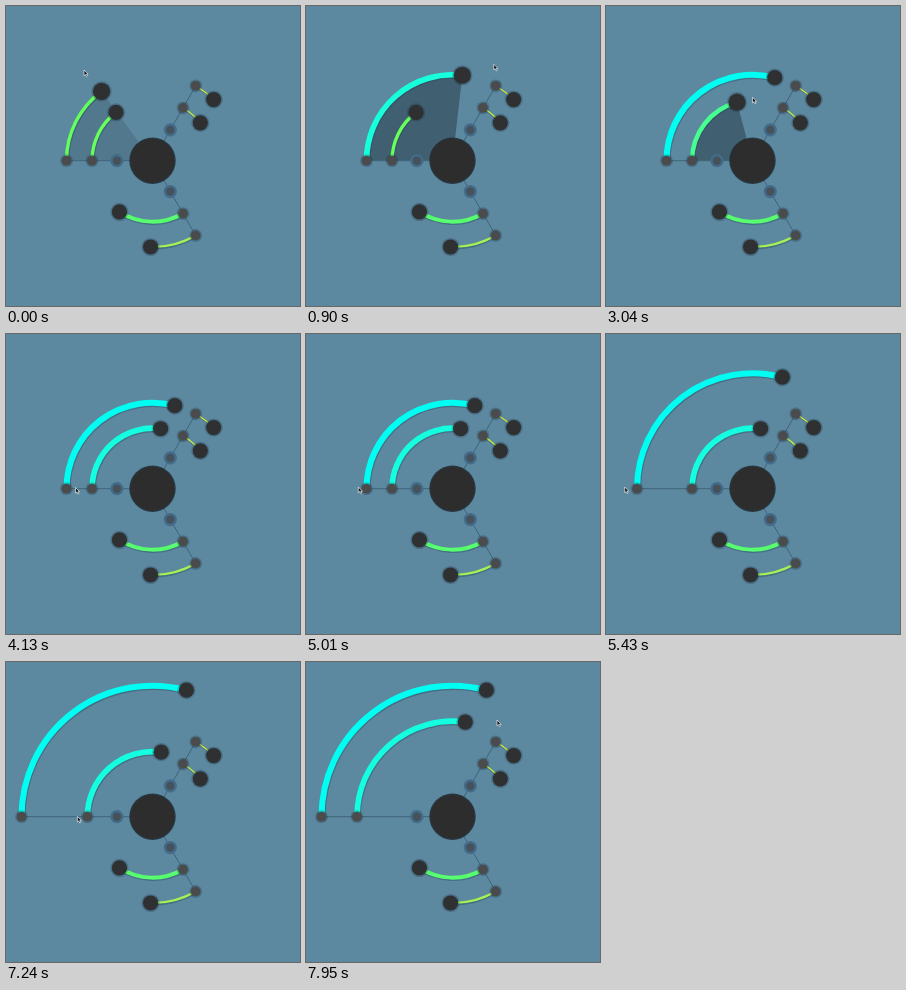
Animation of 294x300 px, one loop 8000 ms. Source, as an HTML page:

```html
<!DOCTYPE html>
<html lang="en">
<head>
<meta charset="utf-8">
<title>Radial sliders</title>
<style>
html, body { margin: 0; width: 100%; height: 100%; overflow: hidden; background: #5c88a0; }
svg { display: block; width: 294px; height: 300px; }
</style>
</head>
<body>
<svg id="stage" viewBox="0 0 294 300" xmlns="http://www.w3.org/2000/svg"></svg>
<script>
const LOOP = 8000, CX = 146.5, CY = 154.7;
const stage = document.getElementById('stage');

function set(el, attrs) {
  for (const k in attrs) el.setAttribute(k, attrs[k]);
}
function add(tag, attrs) {
  const el = document.createElementNS('http://www.w3.org/2000/svg', tag);
  set(el, attrs);
  return stage.appendChild(el);
}

const clamp = (v, lo = 0, hi = 1) => Math.min(hi, Math.max(lo, v));
const ease = u => (1 - Math.cos(Math.PI * u)) / 2;

function polar(r, deg) {
  const a = deg * Math.PI / 180;
  return [CX + r * Math.cos(a), CY + r * Math.sin(a)];
}
function arcPath(r, from, to) {
  const [x, y] = polar(r, from), [x2, y2] = polar(r, to);
  return `M${x} ${y}A${r} ${r} 0 0 ${to > from ? 1 : 0} ${x2} ${y2}`;
}

// Pointer stops: time, x, y
const stops = [
  [90, 78, 64], [1000, 191, 58], [1400, 214, 75], [1880, 122, 89],
  [2240, 109, 105], [2390, 109, 105], [3350, 158, 87], [3850, 51, 160],
  [4130, 69.5, 153.5], [4480, 61.5, 153], [4770, 61.5, 153],
  [5600, 14, 153], [5750, 14, 153], [6380, 86, 154], [6880, 86, 154],
  [7700, 50, 155], [7950, 83, 155]
];

function pointer(t) {
  const i = clamp(stops.findIndex(s => s[0] > t), 1, stops.length - 1);
  const [t0, x0, y0] = stops[i - 1], [t1, x1, y1] = stops[i];
  const u = ease(clamp((t - t0) / (t1 - t0)));
  return [x0 + (x1 - x0) * u, y0 + (y1 - y0) * u];
}

// Each ring is turned by its knob, then resized by its node.
const rings = [
  {
    turn: { press: -100, release: 1400, lag: 235, min: 53.7, max: 105 },
    size: { press: 4770, release: 5750, lag: 170, min: 86, max: 131 }
  },
  {
    turn: { press: 2390, release: 3400, lag: 200, min: 52.8, max: 98.4 },
    size: { press: 6880, release: 7700, lag: 170, min: 60.5, max: 95.5 }
  }
];

// A handle trails the pointer while it is held.
function follow(drag, measure, t) {
  const p = pointer(clamp(t - drag.lag, drag.press, drag.release));
  return clamp(measure(p), drag.min, drag.max);
}
const turnOf = ([x, y]) => Math.atan2(CY - y, CX - x) * 180 / Math.PI;
const sizeOf = ([x]) => CX - x;
const held = (drag, t) =>
  clamp((t - drag.press) / 250) * (1 - clamp((t - drag.release) / 350));

function makeDisc(r, fill) {
  const halo = add('circle', { fill: '#142838', 'fill-opacity': .25 });
  const body = add('circle', { fill });
  return ([cx, cy], grow = 0) => {
    set(halo, { cx, cy, r: r + grow + 1.5 });
    set(body, { cx, cy, r: r + grow });
  };
}

function makeSpine(angle) {
  const line = add('line', { x1: CX, y1: CY, stroke: '#3f647c' });
  const [cx, cy] = polar(35.6, angle);
  add('circle', { cx, cy, r: 6.6, fill: '#426c89' });
  add('circle', { cx, cy, r: 4.2, fill: '#465159' });
  return r => {
    const [x2, y2] = polar(r, angle);
    set(line, { x2, y2 });
  };
}

function makeSlider(angle) {
  const shadow = add('path', {
    fill: 'none', stroke: '#24465a', 'stroke-opacity': .4, transform: 'translate(.5 .8)'
  });
  const arc = add('path', { fill: 'none' });
  const node = makeDisc(4.9, '#494b4d');
  const knob = makeDisc(7.6, '#2f3031');
  return (r, span, hold = 0) => {
    const d = arcPath(r, angle, angle + span);
    const s = Math.abs(span), width = .6 + .052 * s;
    const hue = Math.min(177, 50 + 1.25 * s);
    const sat = Math.min(100, 60 + .8 * s);
    const light = 50 + 18 * Math.sin(Math.PI * Math.min(1, s / 105));
    set(shadow, { d, 'stroke-width': width + 1 });
    set(arc, { d, 'stroke-width': width, stroke: `hsl(${hue}, ${sat}%, ${light}%)` });
    node(polar(r, angle));
    knob(polar(r, angle + span), Math.min(1, 2.5 * hold));
  };
}

const shades = rings.map(() => add('path', {}));
const leftSpine = makeSpine(180);
for (const angle of [-60, 60]) makeSpine(angle)(86.5);
const sliders = rings.map(() => makeSlider(180));

makeSlider(-60)(61, 21.6);
makeSlider(-60)(86.5, 15);
makeSlider(60)(61, 62.8);
makeSlider(60)(86.3, 31.3);

add('circle', { cx: CX, cy: CY, r: 23.2, fill: '#1c252b', 'fill-opacity': .8 });
add('circle', { cx: CX, cy: CY, r: 22, fill: '#2d2d2d' });

const cursor = add('path', {
  d: 'M0 0V5.6L1.4 4.5L2.4 6.7L3.4 6.2L2.4 4.2H4.1Z',
  fill: '#111', stroke: '#e8eef2', 'stroke-width': .7
});

function draw(t) {
  rings.forEach(({ turn, size }, i) => {
    const r = follow(size, sizeOf, t), span = follow(turn, turnOf, t);
    const hold = held(turn, t);
    if (i === 0) leftSpine(r);
    set(shades[i], {
      d: arcPath(r, 180, 180 + span) + `L${CX} ${CY}Z`, 'fill-opacity': .3 * hold
    });
    sliders[i](r, span, hold);
  });
  set(cursor, { transform: `translate(${pointer(t)})` });
}

const start = performance.now();
function tick() {
  draw((performance.now() - start) % LOOP);
  requestAnimationFrame(tick);
}
draw(0);
requestAnimationFrame(tick);
</script>
</body>
</html>
```
